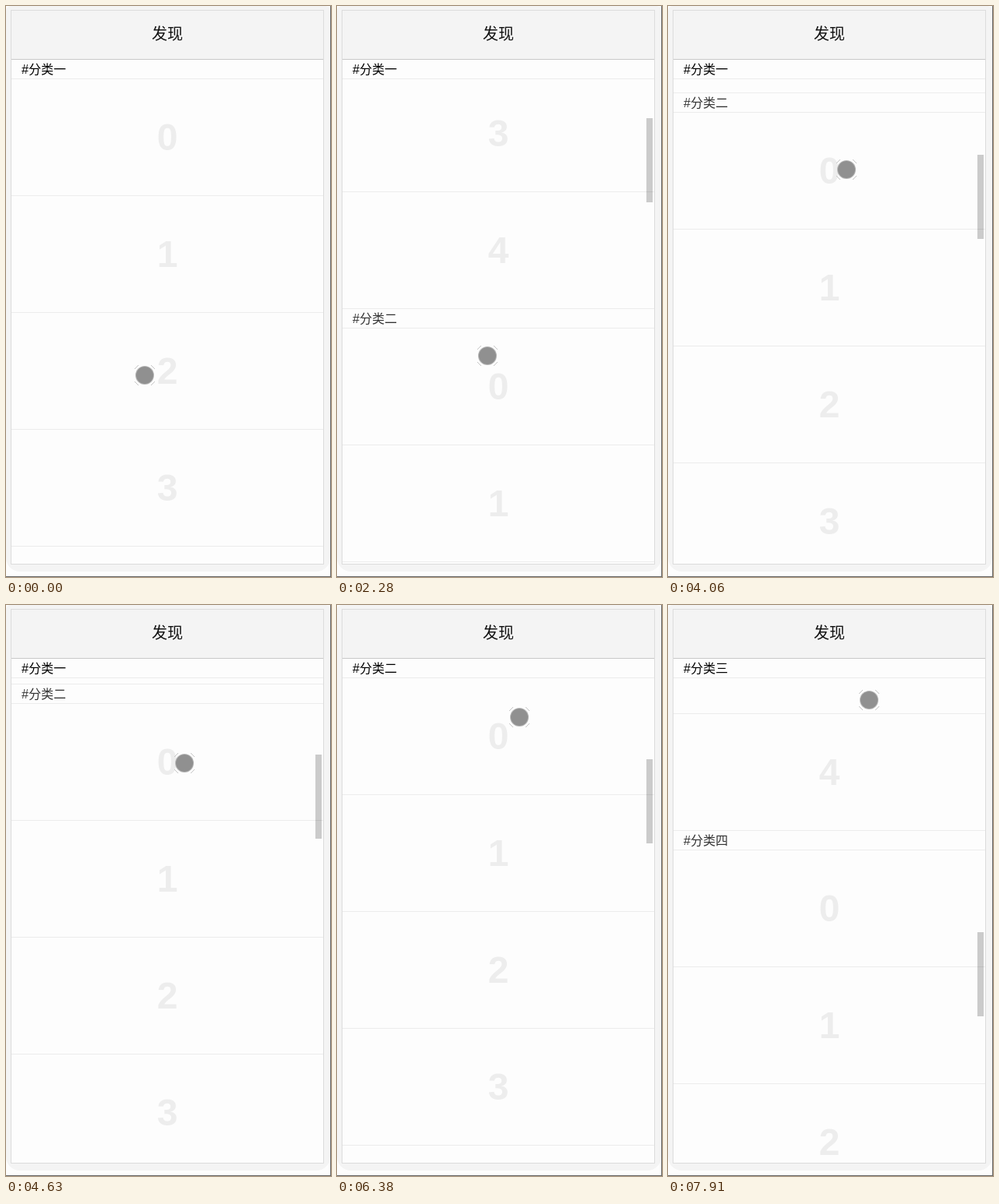
These frames come from a looping animation (417 by 733 pixels, 8000 ms). An HTML page:

```html
<!DOCTYPE html>
<html lang="zh-CN">
<head>
<meta charset="utf-8">
<title>发现</title>
<style>
html, body { margin: 0; width: 100%; height: 100%; overflow: hidden; background: #fdfdfd; }
body { position: relative; font-family: "Liberation Sans", "Noto Sans CJK SC", "Noto Sans CJK", sans-serif; }
div { position: absolute; box-sizing: border-box; }
#stage { left: 0; top: 0; width: 417px; height: 733px; overflow: hidden;
  border: solid #666; border-width: 0 1px 1px 0; }
#shell { left: 0; top: 0; width: 416px; height: 726px; border-radius: 6px 6px 18px 18px; background: #f4f4f4; }
#screen { left: 6px; top: 5px; width: 402px; height: 712px; border: 1px solid #dcdcdc; background: #fdfdfd; }
#nav { left: 7px; top: 6px; width: 400px; height: 63px; background: #f4f4f4; border-bottom: 1px solid #c8c8c8;
  font-size: 20px; font-weight: 300; line-height: 61px; text-align: center; color: #111; }
#view { left: 7px; top: 69px; width: 400px; height: 647px; overflow: hidden; }
#list { left: 0; top: 0; width: 400px; }
.head, .item { left: 0; width: 400px; border-bottom: 1px solid #ececec; background: #fdfdfd; }
.head { height: 25px; padding-left: 13px; font-size: 16px; font-weight: 300; line-height: 25px; color: #333; z-index: 1; }
.head.stuck { color: #000; }
.item { height: 150px; font-size: 48px; font-weight: bold; line-height: 149px; text-align: center; color: #ededed; }
#bar { left: 397px; top: 0; width: 8px; height: 108px; background: rgba(0, 0, 0, .2); }
#touch { position: absolute; left: -15px; top: -15px; }
</style>
</head>
<body>
<div id="stage">
  <div id="shell"></div>
  <div id="screen"></div>
  <div id="view"><div id="list"></div></div>
  <div id="nav">发现</div>
  <div id="bar"></div>
  <svg id="touch" width="30" height="30" viewBox="-15 -15 30 30">
    <circle r="12" fill="#b8b8b8"/>
    <circle r="11" fill="#909090"/>
    <path d="M-13-8L-8-13M13-8L8-13M-13 8L-8 13M13 8L8 13" stroke="#c6c6c6" fill="none"/>
  </svg>
</div>
<script>
const LOOP = 8000, HEAD = 25, ITEM = 150, SECTION = HEAD + 5 * ITEM, VIEW = 647, TOP = 69;
const names = [...'一二三四五'];
const $ = id => document.getElementById(id);

// bursts of redraws: first time, last time, count
const bursts = [
  [820, 1820, 8], [1970, 1970, 1], [2280, 2600, 3], [3180, 4210, 8],
  [4330, 5360, 8], [5510, 6540, 8], [6670, 7080, 4], [7520, 7910, 4]
];
const ticks = bursts.flatMap(([from, to, n]) => Array.from({ length: n }, (_, k) => {
  const inner = k > 0 && k < n - 1;
  return from + (n > 1 ? k * (to - from) / (n - 1) : 0) - (inner ? 15 : 0);
}));

// time, scroll, touch x, touch y
const keys = [
  [0, 0, 178, 474],
  [820, 10, 180, 449], [1091, 150, 189, 330], [1376, 409, 198, 244], [1820, 409, 196, 481],
  [1970, 409, 195, 514], [2280, 455, 193, 449], [2600, 470, 193, 434],
  [3180, 472, 200, 470], [3450, 505, 211, 437], [3606, 575, 217, 367], [4045, 732, 229, 210],
  [5070, 750, 229, 198], [5190, 756, 229, 193], [5510, 760, 229, 189], [5820, 755, 229, 190],
  [6370, 775, 234, 144], [6540, 775, 234, 144],
  [6950, 775, 242, 702], [7080, 783, 243, 688], [7520, 1050, 247, 540], [7910, 2104, 258, 122]
];

function pose(t) {
  const i = keys.findLastIndex(k => k[0] <= t);
  const a = keys[i], b = keys[i + 1] || a;
  const f = b === a ? 0 : (t - a[0]) / (b[0] - a[0]);
  return a.slice(1).map((v, j) => Math.round(v + (b[j + 1] - v) * f));
}

function add(cls, text, y) {
  const el = document.createElement('div');
  el.className = cls;
  el.textContent = text;
  el.style.top = y + 'px';
  $('list').append(el);
  return el;
}

const heads = names.map((name, i) => {
  const y = i * SECTION;
  for (let n = 0; n < 5; n++) add('item', n, y + HEAD + n * ITEM);
  return add('head', '#分类' + name, y);
});

const moveY = (el, y) => { el.style.transform = `translateY(${y}px)`; };

function draw(t) {
  const held = ticks.findLast(s => s <= t) ?? 0;
  const [scroll, x, y] = pose(held);
  moveY($('list'), -scroll);
  heads.forEach((head, i) => {
    const past = scroll - i * SECTION;
    moveY(head, Math.max(0, Math.min(past, SECTION - HEAD)));
    head.classList.toggle('stuck', past >= 0 && past < SECTION);
  });
  $('bar').style.visibility = held ? 'visible' : 'hidden';
  moveY($('bar'), Math.floor(TOP + scroll * VIEW / (names.length * SECTION)));
  $('touch').style.transform = `translate(${x}px, ${y}px)`;
}

const origin = performance.now();
function tick() {
  draw((performance.now() - origin) % LOOP);
  requestAnimationFrame(tick);
}
tick();
</script>
</body>
</html>
```
